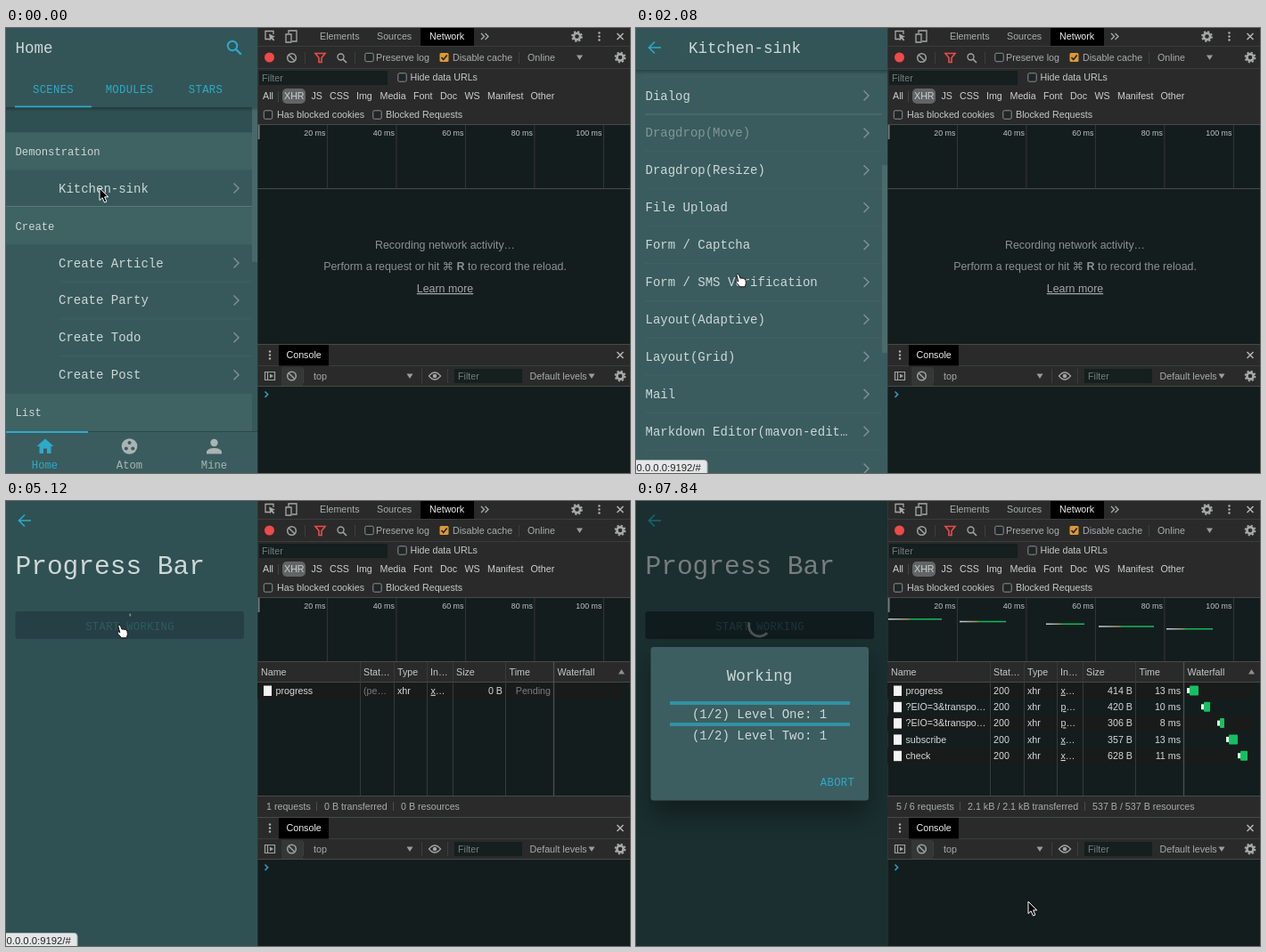
An HTML page for the animation above (8 s loop, 700 by 500 pixels).

```html
<!DOCTYPE html>
<html lang="en">
<head>
<meta charset="utf-8">
<title>Progress demo</title>
<style>
html, body { margin: 0; width: 100%; height: 100%; overflow: hidden; background: #141d1d; }
svg { display: block; width: 700px; height: 500px; }
text { white-space: pre; }
.m { font-family: "Courier New", "Liberation Mono", monospace; }
.s { font-family: "Liberation Sans", "DejaVu Sans", sans-serif; }
</style>
</head>
<body>
<svg viewBox="0 0 700 500">
  <defs>
    <linearGradient id="wave">
      <stop offset="0" stop-color="#c9d0d0"/><stop offset=".3" stop-color="#9aa09a"/>
      <stop offset=".36" stop-color="#d08a3a"/><stop offset=".42" stop-color="#12b85a"/>
      <stop offset=".95" stop-color="#12b85a"/><stop offset="1" stop-color="#3a9ec0"/>
    </linearGradient>
    <linearGradient id="shade" x2="0" y2="1">
      <stop offset="0" stop-opacity=".28"/><stop offset="1" stop-opacity="0"/>
    </linearGradient>
    <filter id="blur" x="-30%" y="-40%" width="160%" height="180%"><feGaussianBlur stdDeviation="14"/></filter>
    <clipPath id="phone"><rect width="282" height="500"/></clipPath>
  </defs>
  <g id="tools"></g>
  <g id="network"></g>
  <g id="app" clip-path="url(#phone)"></g>
  <g id="over"></g>
</svg>
<script>
const LOOP = 8000, STEP = 160;
const BLUE = '#2fa9c9', INK = '#cfd7d7', GREY = '#a8adad', ROW = 41.9;
const $ = id => document.getElementById(id);

const rect = (x, y, w, h, fill, extra = '') =>
  `<rect x="${x}" y="${y}" width="${w}" height="${h}" fill="${fill}" ${extra}/>`;
const line = (d, color, w = 1, extra = '') =>
  `<path d="${d}" fill="none" stroke="${color}" stroke-width="${w}" ${extra}/>`;
const shape = (d, fill, extra = '') => `<path d="${d}" fill="${fill}" ${extra}/>`;
const circle = (x, y, r, fill, extra = '') => `<circle cx="${x}" cy="${y}" r="${r}" fill="${fill}" ${extra}/>`;
const label = (cls, x, y, str, size, fill, extra = '') =>
  `<text class="${cls}" x="${x}" y="${y}" font-size="${size}" fill="${fill}" ${extra}>${str.replace(/&/g, '&amp;')}</text>`;
const mono = (x, y, str, size = 14, fill = INK, extra) => label('m', x, y, str, size, fill, extra);
const sans = (x, y, str, fill = GREY, size = 10.7, extra) => label('s', x, y, str, size, fill, extra);
const MID = 'text-anchor="middle"', END = 'text-anchor="end"';
const CAPS = MID + ' letter-spacing=".35"';

const clamp = v => Math.max(0, Math.min(1, v));
const ease = v => 1 - (1 - clamp(v)) ** 3;
// Piecewise linear value from [time, value] pairs
function along(keys, t) {
  if (t <= keys[0][0]) return keys[0][1];
  for (let i = 1; i < keys.length; i++) {
    const [a, u] = keys[i - 1], [b, v] = keys[i];
    if (t <= b) return u + (v - u) * (t - a) / (b - a);
  }
  return keys[keys.length - 1][1];
}

// ---- icons ----
const cross = (x, y) => line(`M${x - 3.5} ${y - 3.5}l7 7m0-7l-7 7`, '#b4b6b6', 1.5);
const dots = (x, y) => [-4, 0, 4].map(d => circle(x, y + d, 1.2, '#b0b2b2')).join('');
const gear = (x, y) => circle(x, y, 3.6, 'none', 'stroke="#a6a9a9" stroke-width="2.6"') +
  circle(x, y, 5.4, 'none', 'stroke="#a6a9a9" stroke-width="2" stroke-dasharray="2.1 2.14"');
const ban = (x, y) => circle(x, y, 4.8, 'none', 'stroke="#a0a3a3" stroke-width="1.5"') +
  line(`M${x - 3.3} ${y - 3.3}l6.6 6.6`, '#a0a3a3', 1.5);
const lens = (x, y, k, color, w) => circle(x - k, y - k, 3.5 * k, 'none', `stroke="${color}" stroke-width="${w}"`) +
  line(`M${x + 1.5 * k} ${y + 1.5 * k}l${4 * k} ${4 * k}`, color, w * 1.2);
const drop = (x, y) => shape(`M${x - 3.5} ${y - 2.5}h7l-3.5 5.5z`, '#9a9d9d');
const box = (x, y) => rect(x - 4.7, y - 4.7, 9.4, 9.4, '#202626', 'rx="1.5" stroke="#8c9090"');
const chevron = y => line(`M255.5 ${y - 5.5}l5.5 5.5l-5.5 5.5`, '#819494', 1.4);
const back = line('M28 22H15m6-6.5l-6.5 6.5l6.5 6.5', BLUE, 1.6);

// ---- developer tools ----
function drawTools() {
  const bar = '#2a2a2a', rim = '#474a4a';
  let s = rect(282, 0, 418, 500, '#141d1d') + rect(282, 0, 418, 109, bar) + rect(465, 0, 60, 20.5, '#000');
  for (const y of [20.5, 45.5, 108.5]) s += line(`M282 ${y}H700`, y > 100 ? rim : '#3b3d3d');
  s += line('M297 12.5h-6v-9h9v3.5', '#a6a9a9', 1.3) + shape('M295 6.5l7 3.2l-3 1l2.3 2.6l-1.2 1.2l-2.5-2.6l-1.2 2.6z', '#a6a9a9') +
    line('M317 6V3h9v12h-5M314 7h6v9h-6z', '#a6a9a9', 1.3) +
    sans(352, 13, 'Elements') + sans(416, 13, 'Sources') + sans(475, 13, 'Network', '#eee') +
    line('M533 6l3.5 3.5l-3.5 3.5m4.5-7l3.5 3.5l-3.5 3.5', GREY, 1.3) +
    gear(640.5, 9.5) + dots(665.5, 9.5) + cross(689, 9.5);
  s += circle(295.5, 33, 5.5, '#f04a48') + ban(320.5, 33.5) +
    shape('M347 28.5h11l-4 5v5h-3v-5z', 'none', 'stroke="#f04a48" stroke-width="1.6"') +
    line('M335.5 27v13M391.5 27v13', '#3c3f3f') + lens(376.5, 33.5, 1, '#a0a3a3', 1.4) +
    box(407.5, 33) + sans(415, 37, 'Preserve log') +
    rect(486.5, 28, 10, 10, '#dd9a31', 'rx="1.5"') + line('M488.5 33l2.2 2.5l4-5', '#2a2218', 1.6) +
    sans(501, 37, 'Disable cache') + line('M575.5 27v13', '#3c3f3f') +
    sans(585, 37, 'Online') + drop(643.5, 33) + gear(689, 33);
  s += rect(284, 48, 144, 16, '#141f1e') + sans(287, 60, 'Filter', '#777d7d') +
    box(444.5, 55.5) + sans(453.5, 59.3, 'Hide data URLs', '#c4c8c8');
  s += rect(310, 68, 26, 17, '#626565', 'rx="5"');
  const kinds = { All: 288, XHR: 312, JS: 342.5, CSS: 363, Img: 393, Media: 419.5, Font: 457, Doc: 487, WS: 514.5, Manifest: 540, Other: 588.5 };
  for (const k in kinds) s += sans(kinds[k], 80.3, k, '#cdd0d0');
  s += line('M305.5 71v12', '#444');
  s += box(294, 97.5) + sans(304, 101.3, 'Has blocked cookies', '#c4c8c8') +
    box(416.5, 97.5) + sans(426, 101.3, 'Blocked Requests', '#c4c8c8');
  for (let i = 1; i <= 5; i++) {
    const x = 282.9 + 77.5 * i;
    s += line(`M${x} 109V180`, '#3a3538') + sans(x - 2, 120.5, i * 20 + ' ms', '#bfc3c3', 8.9, END);
  }
  s += rect(282.5, 109, 2, 16, '#777c7c') + line('M282 180.5H700', rim);
  s += rect(282, 355, 418, 48, bar) + line('M282 355.5H700M282 402.5H700', rim) + line('M282 379.5H700', '#3b3d3d') +
    rect(306, 356, 56, 23.5, '#000') + dots(296, 367.5) + sans(314.5, 371.3, 'Console', '#eee') + cross(689, 367.5);
  s += line('M290.5 386.5h11v9h-11zM293.5 386.5v9', '#a0a3a3', 1.2) + shape('M296 388.5l4 2.5l-4 2.5z', '#a0a3a3') +
    rect(309, 381, 24, 21, '#353737') + ban(320.5, 391) + sans(345, 394.7, 'top') + drop(453, 391) +
    line('M333.5 383v16M466.5 383v16M495.5 383v16', '#3c3f3f') +
    line('M474.5 391q6.5-8 13 0q-6.5 8-13 0z', '#a0a3a3', 1.3) + circle(481, 391, 2.3, '#a0a3a3') +
    rect(503, 383, 76, 16, '#141f1e') + sans(507, 395, 'Filter', '#777d7d') +
    sans(587.5, 394.7, 'Default levels') + drop(657, 391) + gear(689, 391);
  return s + line('M290.5 408.5l3.2 3.2l-3.2 3.2', '#2d9fc4', 1.5) + line('M281.9 0V500', '#3f4848');
}

// name, initiator, size, time, bar x, bar width, overview x, overview width
const REQUESTS = [
  ['progress', 'x', '414 B', '13 ms', 621, 10, 283, 60],
  ['?EIO=3&transpo…', 'p', '420 B', '10 ms', 637, 7, 363, 52],
  ['?EIO=3&transpo…', 'p', '306 B', '8 ms', 655, 5, 460, 43],
  ['subscribe', 'x', '357 B', '13 ms', 665, 10, 519, 62],
  ['check', 'x', '628 B', '11 ms', 678, 8, 595, 52]
];

function drawNetwork(t) {
  if (t < 5120) {
    return sans(492.5, 248, 'Recording network activity…', '#8b9191', 12.4, MID) +
      sans(492.5, 272, 'Perform a request or hit ⌘ <tspan font-weight="bold">R</tspan> to record the reload.', '#8b9191', 12.4, MID) +
      sans(492.5, 297, 'Learn more', '#a3a8a8', 12.4, MID + ' text-decoration="underline"');
  }
  const done = t >= 5440, white = '#d6d9d9';
  let s = rect(282, 181, 418, 22.5, '#2a2a2a') + rect(282, 331.5, 418, 23.5, '#2a2a2a') +
    line('M282 203.5H700M282 331.5H700', '#474a4a');
  const cols = { Name: 286, 'Stat…': 401, Type: 439, 'In…': 476, Size: 505, Time: 564.5, Waterfall: 618.5 };
  for (const c in cols) s += sans(cols[c], 195.7, c, '#c4c8c8');
  s += shape('M687 194.5h7l-3.5-5.5z', '#8c9090');
  const rows = done ? REQUESTS : REQUESTS.slice(0, 1);
  rows.forEach(([name, from, size, time, x, w, ox, ow], i) => {
    const mid = 213 + 18.3 * i, y = mid + 3.8;
    if (i % 2 == 0) s += rect(282, mid - 9, 409, 18.3, '#191b1b');
    s += rect(289, mid - 5.5, 9, 11.5, '#f4f4f4') + sans(302.5, y, name, white) +
      sans(401, y, done ? '200' : '(pe…', done ? white : '#777d7d') + sans(439, y, 'xhr', white) +
      sans(476.5, y, `<tspan text-decoration="underline">${from}</tspan>…`, white) +
      sans(557, y, done ? size : '0 B', white, 10.7, END) +
      sans(611, y, done ? time : 'Pending', done ? white : '#777d7d', 10.7, END);
    if (done) {
      s += rect(x - 3, mid - 3, 3, 6, '#eee') + rect(x, mid - 5.5, w, 11, '#14c160', 'rx="1"') +
        rect(ox, 132 + 2.75 * i, ow, 1.5, 'url(#wave)');
    }
  });
  for (const x of [397.5, 435.5, 472.5, 501.5, 560.5]) s += line(`M${x} 181V331`, '#343a3a');
  s += line('M614.5 181V331', '#4a5050', 1.3);
  const sums = done ? ['5 / 6 requests', '2.1 kB / 2.1 kB transferred', '537 B / 537 B resources']
    : ['1 requests', '0 B transferred', '0 B resources'];
  const at = done ? [292, 372, 512] : [292, 357, 443];
  sums.forEach((v, i) => {
    s += sans(at[i], 346.7, v);
    if (i) s += line(`M${at[i] - 8.5} 338v10`, '#4a4d4d');
  });
  return s;
}

// ---- phone pages ----
const thumb = (y, h) => rect(276, y, 6, h, '#fff', 'opacity=".09"');

function drawHome() {
  let s = rect(0, 0, 282, 500, '#37595b') + rect(0, 0, 282, 89, '#335557') +
    mono(10.5, 28, 'Home', 17.5) + lens(255.5, 21.5, 1.5, BLUE, 2) +
    mono(53, 72.5, 'SCENES', 12.2, BLUE, CAPS) + mono(138.5, 72.5, 'MODULES', 12.2, BLUE, CAPS) +
    mono(224, 72.5, 'STARS', 12.2, BLUE, CAPS) +
    rect(0, 89, 276, 28, '#2f5053') + rect(0, 89, 282, 5, 'url(#shade)') + rect(10, 87.5, 86, 1.8, BLUE);
  const group = (y, name) => rect(0, y - 21, 276, 42, '#3f6263') + mono(10.5, y + 4, name, 12.2);
  const item = (y, name) => mono(59, y + 4.5, name) + chevron(y);
  s += group(138.5, 'Demonstration') + item(180, 'Kitchen-sink') + line('M0 200.5H276', '#5f7979') + group(222.5, 'Create');
  ['Article', 'Party', 'Todo', 'Post'].forEach((n, i) => {
    const y = 264 + ROW * i;
    s += item(y, 'Create ' + n);
    if (i < 3) s += line(`M59 ${y + 21}H276`, '#fff', 1, 'opacity=".04"');
  });
  s += group(432, 'List') + thumb(89, 174) + rect(0, 453.5, 282, 47, '#3a5c5e') + line('M0 453.5H282', '#2b4749') + rect(0, 453, 92, 2, BLUE);
  s += shape('M44 461.5l9.5 8.5h-3v8h-4.5v-5.5h-4v5.5h-4.5v-8h-3z', BLUE) +
    circle(138.5, 470, 8.8, '#a9b4b4') + circle(138.5, 466, 2, '#3a5c5e') + circle(134.8, 472.5, 2, '#3a5c5e') + circle(142.3, 472.5, 2, '#3a5c5e') +
    circle(233.5, 466, 4.2, '#a9b4b4') + shape('M225 478.5v-2.5q1.5-4 8.5-4t8.5 4v2.5z', '#a9b4b4');
  ['Home', 'Atom', 'Mine'].forEach((n, i) => s += mono(43.5 + 95 * i, 494.5, n, 12.2, i ? '#a9b4b4' : BLUE, MID));
  return s;
}

const ITEMS = ['About', 'Framework7', 'Guide', 'Atom', 'Box Container', 'Button Event', 'Dialog', 'Dragdrop(Move)',
  'Dragdrop(Resize)', 'File Upload', 'Form / Captcha', 'Form / SMS Verification', 'Layout(Adaptive)', 'Layout(Grid)',
  'Mail', 'Markdown Editor(mavon-edit…', 'Monkey', 'Page Open & Return Value', 'Progress Bar',
  'Pull To Refresh / Infinite…', 'Settings', 'Socket IO'];
const SCROLL = [[1120, 0], [1280, 16], [1760, 150], [2240, 290], [2720, 440], [3040, 482]];

function drawSink(t) {
  const top = along(SCROLL, t), y0 = 68 - top;
  // The highlight trails behind the scroll
  const lit = t < 3360 ? Math.floor((231 + along(SCROLL, t - 500)) / ROW) : 18;
  let s = rect(0, 0, 282, 500, '#3a5c5e');
  ITEMS.forEach((name, i) => {
    const y = y0 + ROW * i;
    if (y < 20 || y > 525) return;
    s += mono(10.5, y + 4.5, name, 14, i == lit ? '#829696' : INK) + chevron(y) +
      line(`M10 ${y - 21}H276`, '#fff', 1, `opacity="${i == lit ? .15 : .04}"`);
  });
  return s + thumb(47 + top * .44, 211) + rect(0, 0, 282, 47, '#335557') + rect(0, 47, 282, 5, 'url(#shade)') +
    back + mono(59, 28, 'Kitchen-sink', 17.5);
}

function drawSpinner(dt) {
  const from = .0492 * dt, span = 8 + 290 * Math.sin(Math.PI * dt / 640) ** 2;
  const at = deg => {
    const a = (deg - 90) * Math.PI / 180;
    return `${138.5 + 12 * Math.cos(a)} ${140 + 12 * Math.sin(a)}`;
  };
  return line(`M${at(from)}A12 12 0 ${span > 180 ? 1 : 0} 1 ${at(from + span)}`, '#7d8e90', 2.8);
}

function drawWork(t) {
  const busy = t >= 5120, fade = ease((t - 5120) / 320);
  return rect(0, 0, 282, 500, '#2f5153') + back + mono(10.5, 82, 'Progress Bar', 29.5) +
    (busy ? rect(10.5, 124, 256.5, 31, '#253f45', 'rx="3"') + rect(10.5, 124, 256.5, 31, '#000', `rx="3" opacity="${.28 * fade}"`) : '') +
    mono(139, 144.5, 'START WORKING', 12.2, busy ? '#2f5b61' : BLUE, CAPS) +
    (busy ? drawSpinner(t - 5120) : '');
}

function drawDialog(t) {
  const shown = ease((t - 5280) / 400);
  if (!shown) return '';
  const two = t >= 6880, h = two ? 172 : 148, y = 250 - h / 2;
  const level = (name, start, bar) => {
    const v = Math.floor(clamp((t - start) / 560) * 10) / 10;
    return rect(38, bar, 202, 4, '#33616b') + rect(38, bar, 202 * v, 4, '#3391a4') +
      mono(138.5, bar + 19, `(1/2) Level ${name}: ${v}`, 14, INK, MID);
  };
  const k = .8 + .2 * shown;
  return rect(0, 0, 282, 500, '#000', `opacity="${.42 * shown}"`) +
    `<g opacity="${shown}" transform="translate(138.5 250) scale(${k}) translate(-138.5 -250)">` +
    rect(17, y + 16, 244, h, '#000', 'opacity=".38" filter="url(#blur)"') + rect(16.5, y, 244.5, h + .5, '#3c5e60', 'rx="3.5"') +
    mono(138.5, y + 38, 'Working', 17.5, INK, MID) + level('One', 5680, y + 61) +
    (two ? level('Two', 6880, y + 85) : '') + mono(226, y + h - 16, 'ABORT', 12.2, BLUE, CAPS) + '</g>';
}

function page(content, p) {
  return p ? `<g opacity="${p}" transform="translate(0 ${56 * (1 - p)})">${content}</g>` : '';
}

function drawApp(t) {
  const sink = ease((t - 480) / 280), work = ease((t - 3520) / 280);
  return (sink < 1 ? drawHome() : '') + (sink && work < 1 ? page(drawSink(t), sink) : '') +
    (work ? page(drawWork(t), work) : '') + drawDialog(t);
}

// ---- pointer, tooltip, link bubble ----
const PX = [[320, 105], [960, 113], [3360, 113], [3680, 99], [4320, 99], [4800, 126], [5280, 126], [6080, 408], [6720, 408], [7040, 440]];
const PY = [[320, 180], [960, 276], [3040, 276], [3360, 337], [4320, 337], [4800, 139], [5280, 139], [6080, 396], [6720, 396], [7040, 450]];
const ARROW = 'M0 0V13.5l3.1-2.8l2.4 5.3l2.4-1l-2.3-5.2h4.1z';
const HAND = 'M-.2 1.4q1-1.9 2.6-.2l1.6 4q1.2-.9 2 .2q1.300-.8 2 .4q1.500-.3 1.900 1.300l.5 3.400l-1 4.300h-5.800l-4.200-4.800q-1.300-2.200.7-2.200l1.700 1.200z';

function drawOver(t) {
  const hand = (t >= 160 && t < 3680) || (t >= 4640 && t < 5440);
  let s = '';
  if (t >= 320 && t < 5760) {
    s += rect(-5, 485.5, 85, 20, '#e4e7e7', 'rx="3.5" stroke="#a9adad"') + sans(.5, 497.5, '0.0.0.0:9192/#', '#222', 11.3);
  }
  if (t >= 6240 && t < 6720) {
    s += rect(340.5, 404.5, 124, 21.5, '#242727', 'stroke="#343838"') + sans(348, 419, 'JavaScript context: top', '#c9cdcd');
  }
  return s + `<g transform="translate(${along(PX, t)} ${along(PY, t)})">` +
    shape(hand ? HAND : ARROW, hand ? '#fff' : '#000', `stroke="${hand ? '#111' : '#fff'}" stroke-linejoin="round"`) + '</g>';
}

let last = -1;
function update(now) {
  const t = Math.floor(now % LOOP / STEP) * STEP;
  if (t !== last) {
    last = t;
    $('network').innerHTML = drawNetwork(t);
    $('app').innerHTML = drawApp(t);
    $('over').innerHTML = drawOver(t);
  }
}

$('tools').innerHTML = drawTools();
const start = performance.now();
function tick() {
  update(performance.now() - start);
  requestAnimationFrame(tick);
}
tick();
</script>
</body>
</html>
```
